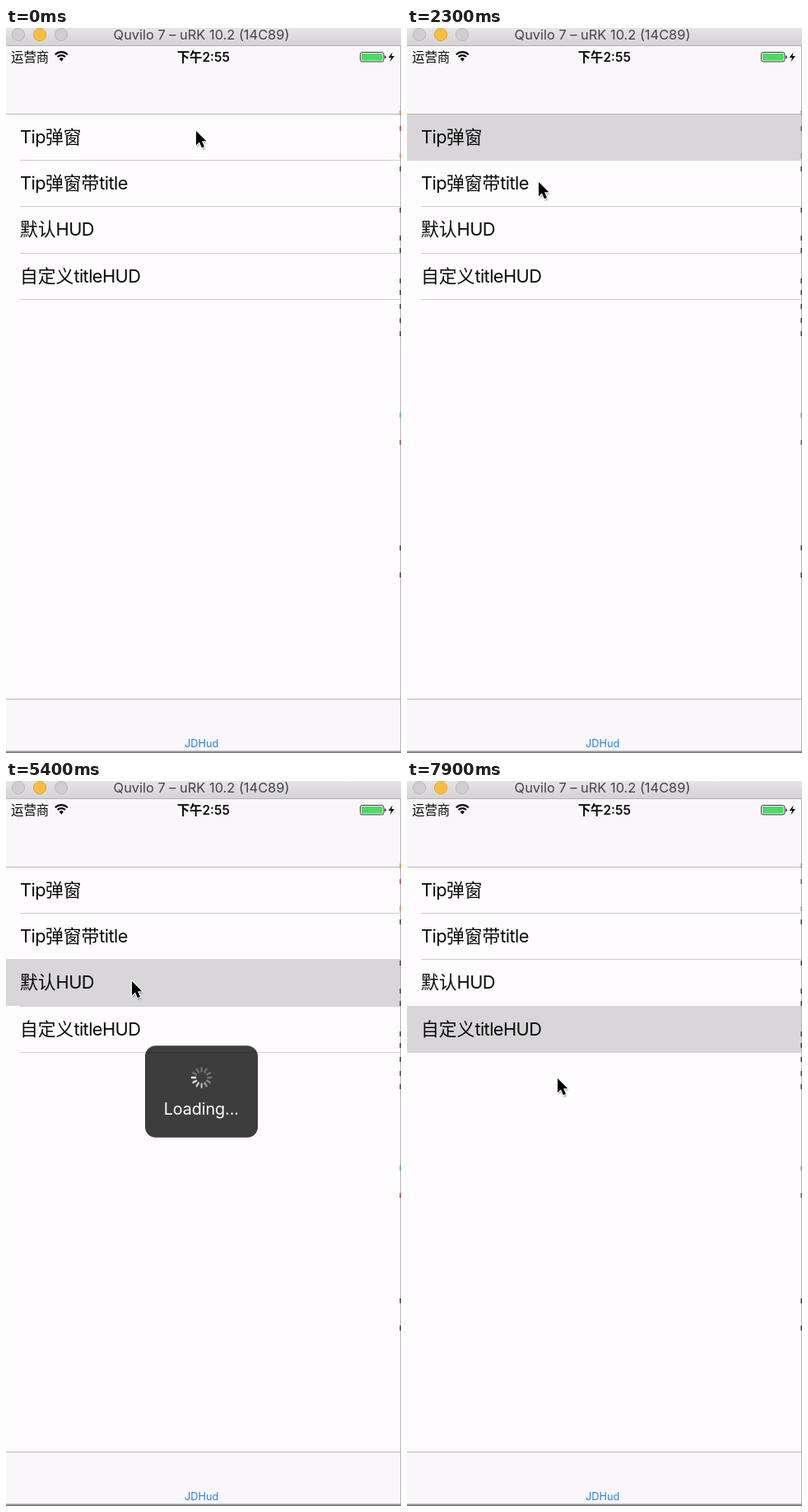
An HTML page that plays this animation: 480x880 px, repeating every 8 s.

```html
<!DOCTYPE html>
<html lang="zh">
<head>
<meta charset="utf-8">
<title>HUD demo</title>
<style>
html, body { margin: 0; width: 100%; height: 100%; overflow: hidden; background: #fefcff; }
svg { display: block; width: 100%; height: 100%; }
text { font-family: Inter, "Noto Sans CJK SC", "Noto Sans CJK", sans-serif; fill: #0a0a0a; white-space: pre; }
.row text { font-size: 21.8px; }
.lat { letter-spacing: -.6px; }
.mid { text-anchor: middle; }
.hud { opacity: 0; }
.hud text { fill: #fff; text-anchor: middle; }
</style>
</head>
<body>
<svg viewBox="0 0 480 880" preserveAspectRatio="none">
  <defs>
    <linearGradient id="bar" x2="0" y2="1">
      <stop offset="0" stop-color="#e6e4e7"/><stop offset="1" stop-color="#d3d1d4"/>
    </linearGradient>
    <filter id="soft" x="-50%" y="-50%" width="200%" height="200%"><feGaussianBlur stdDeviation="1.2"/></filter>
    <path id="arrow" d="M0 0V17.2L4 13.5L6.9 20.2L10 18.9L7.1 12.3H12.4Z"/>
  </defs>

  <rect width="480" height="880" fill="#fefcff"/>
  <rect y="22" width="480" height="82" fill="#f9f7fa"/>
  <rect y="104" width="480" height="1" fill="#bab8bb"/>
  <rect y="814" width="480" height="64" fill="#f9f7fa"/>
  <rect y="814" width="480" height="1" fill="#bab8bb"/>

  <rect width="480" height="22" fill="url(#bar)"/>
  <rect y="21" width="480" height="1" fill="#b4b2b5"/>
  <g stroke-width="1">
    <circle cx="15" cy="8" r="7.6" fill="#d0ced1" stroke="#b9b7ba"/>
    <circle cx="41" cy="8" r="7.6" fill="#fdbd3f" stroke="#e0a237"/>
    <circle cx="67" cy="8" r="7.6" fill="#d0ced1" stroke="#b9b7ba"/>
  </g>
  <text class="mid" x="237.5" y="14" font-size="16.4" style="fill:#454446">Quvilo 7 – uRK 10.2 (14C89)</text>

  <text x="6" y="41" font-size="15.4">运营商</text>
  <g fill="none" stroke="#0a0a0a" stroke-width="2.2">
    <path d="M59.8 32.2A10.6 10.6 0 0 1 74.8 32.2M62.6 35A6.6 6.6 0 0 1 72 35"/>
    <path d="M67.3 40.4L64.7 37.4A3.6 3.6 0 0 1 69.9 37.4Z" fill="#0a0a0a" stroke="none"/>
  </g>
  <text class="mid" x="239.8" y="41" font-size="15.4" font-weight="600">下午2:55</text>
  <rect x="430.5" y="29.5" width="28.5" height="11.4" rx="2.4" fill="none" stroke="#39383a"/>
  <rect x="432" y="31" width="25.5" height="8.4" rx="1" fill="#4cd964"/>
  <path d="M460.2 33.2A2.2 2.2 0 0 1 460.2 37.4Z" fill="#222"/>
  <path d="M469.6 29.4L464.6 36H468L466.6 41L472 34H468.5Z" fill="#0a0a0a"/>

  <g id="lines" fill="#cfcdd1"></g>
  <rect id="pick" width="480" fill="#d8d6d9"/>
  <g class="row">
    <text x="17" y="139.5"><tspan class="lat">Tip</tspan>弹窗</text>
    <text x="17" y="195.8"><tspan class="lat">Tip</tspan>弹窗带<tspan class="lat">title</tspan></text>
    <text x="17" y="252.2">默认<tspan class="lat">HUD</tspan></text>
    <text x="17" y="308.5">自定义<tspan class="lat">titleHUD</tspan></text>
  </g>
  <text class="mid" x="237.7" y="873" font-size="12.8" style="fill:#2a80e4">JDHud</text>

  <g class="hud">
    <rect x="181" y="317" width="114" height="63" rx="4" fill-opacity=".7"/>
    <text x="238" y="356" font-size="19.3">无网络</text>
  </g>
  <g class="hud">
    <rect x="84" y="304.5" width="308" height="88.5" rx="4" fill-opacity=".7"/>
    <text x="238" y="342.5" font-size="23" font-weight="500">无网络</text>
    <text x="238" y="373" font-size="20.5">假的啊</text>
  </g>
  <g class="hud">
    <rect x="169" y="321.3" width="137" height="111.5" rx="13" fill-opacity=".757"/>
    <g class="spin"></g>
    <text x="237.3" y="404.5" font-size="19.8" letter-spacing="-.1">Loading...</text>
  </g>
  <g class="hud">
    <rect x="162.5" y="321.3" width="151" height="111.5" rx="13" fill-opacity=".757"/>
    <g class="spin"></g>
    <text x="238" y="404.5" font-size="20.3">正在加载...</text>
  </g>

  <rect x="479" y="22" width="1" height="856" fill="#b5b3b7"/>
  <g id="edge"></g>
  <rect y="877.6" width="480" height="2.4" fill="#77757a"/>
  <rect y="877.6" width="480" height="1" fill="#b0aeb2"/>

  <g id="mouse">
    <use href="#arrow" x="1" y="2.5" opacity=".38" filter="url(#soft)"/>
    <use href="#arrow" fill="#000" stroke="#fff" stroke-width="2" stroke-linejoin="round" paint-order="stroke"/>
  </g>
</svg>
<script>
const LOOP = 8000, STEP = 100, ROW = 56.35;
const $ = s => document.querySelector(s), $$ = s => [...document.querySelectorAll(s)];

function add(parent, tag, attrs) {
  const el = document.createElementNS("http://www.w3.org/2000/svg", tag);
  for (const k in attrs) el.setAttribute(k, attrs[k]);
  parent.append(el);
  return el;
}

for (let i = 1; i <= 4; i++)
  add($("#lines"), "rect", { x: 17, y: Math.round(103.6 + i * ROW), width: 463, height: 1 });

// slivers of the desktop beside the window
const flecks = {
  "#d98a5c": [103, 155], "#b5503f": [122, 503], "#55a9cf": [470],
  "#4b494d": [171, 221, 255, 270, 307, 321, 338, 355, 371, 631, 664]
};
for (const fill in flecks)
  for (const y of flecks[fill])
    add($("#edge"), "rect", { x: 478.4, y: y - 3, width: 1.6, height: 6, fill });

const spinners = $$(".spin").map(g => Array.from({ length: 12 }, (_, i) =>
  add(g, "rect", {
    x: -1.2, y: -13, width: 2.4, height: 6.6, rx: 1.2, fill: "#fff",
    transform: `translate(237.7 360) rotate(${i * 30})`
  })));

const picks = [[0, -1], [100, 0], [2700, 1], [4300, 2], [6500, 3]];

// [time, x, y]
const path = [
  [0, 231, 125], [600, 231, 125], [700, 226, 129], [900, 205, 149], [1100, 180, 172],
  [1200, 171, 179], [1300, 166, 183], [1400, 162, 186], [1500, 160, 187],
  [3600, 160, 187], [3800, 159, 204], [4000, 154, 237], [4100, 153, 243],
  [5800, 153, 243], [6000, 151, 262], [6200, 146, 297], [6300, 145, 303],
  [7800, 145, 303], [7900, 183, 361], [8000, 183, 361]
];

// [time, opacity] for each panel
const fades = [
  [[300, 0], [400, .18], [500, .42], [600, .66], [700, 1], [1900, 1], [2000, .82], [2300, 0]],
  [[2700, 0], [2800, .03], [2900, .03], [3000, .18], [3100, .42], [3200, .66], [3300, 1], [3600, 1], [3700, .82], [4000, 0]],
  [[4400, 0], [4600, .42], [4800, 1], [5900, 1], [6200, .05], [6300, 0]],
  [[6600, 0], [6800, .42], [7000, 1], [7100, .82], [7300, .1], [7400, 0]]
];

function at(keys, t) {
  const n = keys.findIndex(k => k[0] > t);
  if (n === 0) return keys[0].slice(1);
  if (n < 0) return keys[keys.length - 1].slice(1);
  const a = keys[n - 1], b = keys[n], p = (t - a[0]) / (b[0] - a[0]);
  return a.slice(1).map((v, i) => v + (b[i + 1] - v) * p);
}

const huds = $$(".hud"), pick = $("#pick"), mouse = $("#mouse");

function draw(t) {
  const row = picks.filter(p => p[0] <= t).pop()[1];
  pick.setAttribute("y", row ? Math.round(103.6 + row * ROW) : 105);
  pick.setAttribute("height", row < 0 ? 0 : row ? 57 : 56);

  huds.forEach((h, i) => h.style.opacity = at(fades[i], t)[0]);

  const head = Math.floor((t - 5400) / 1000 * 12 + 9 + 120) % 12;
  for (const spokes of spinners)
    spokes.forEach((s, i) => {
      const age = (head - i + 12) % 12;
      s.setAttribute("fill-opacity", Math.max(.27, .92 - age * .11));
    });

  const [x, y] = at(path, t);
  mouse.setAttribute("transform", `translate(${x} ${y})`);
}

const start = performance.now();
function tick() {
  const t = (performance.now() - start) % LOOP;
  draw(Math.floor(t / STEP) * STEP);
  requestAnimationFrame(tick);
}
tick();
</script>
</body>
</html>
```
